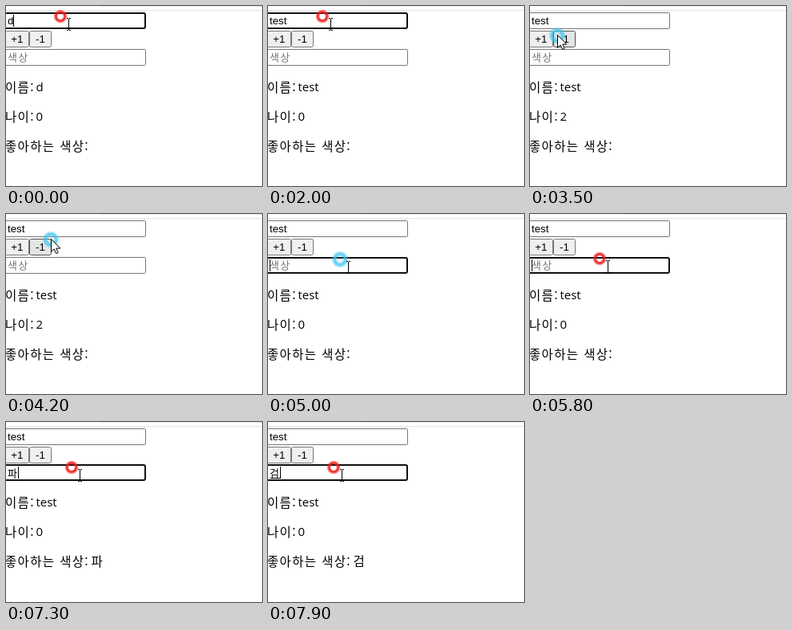
These frames come from a looping animation (320x226 px, 8 s). An HTML page:

```html
<!DOCTYPE html>
<html lang="ko">
<head>
<meta charset="utf-8">
<title>Form demo</title>
<style>
  html, body { margin: 0; width: 100%; height: 100%; overflow: hidden; background: #fff; }
  svg { display: block; width: 100vw; height: 100vh; }
  text { fill: #000; white-space: pre; }
  .field { font: 13.333px "Liberation Sans", Arial, sans-serif; }
  .ko { font: 300 13px "Noto Sans CJK KR", "Noto Sans CJK JP", sans-serif; letter-spacing: 1.35px; }
  .label { font: 300 15.5px "Noto Sans CJK KR", "Noto Sans CJK JP", sans-serif; letter-spacing: 1.35px; }
  .value { font: 15px "Open Sans", "Noto Sans", sans-serif; }
  .hint { fill: #757575; }
  .box { fill: #fff; stroke: #767676; }
  .box.focus { stroke: #101010; stroke-width: 2; }
  .button { fill: #efefef; stroke: #767676; }
  .button.hover { fill: #e5e5e5; stroke: #4f4f4f; }
</style>
</head>
<body>
<svg viewBox="0 0 320 226">
  <defs>
    <radialGradient id="red">
      <stop offset=".35" stop-color="#f01818" stop-opacity="0"/>
      <stop offset=".55" stop-color="#f01818" stop-opacity=".95"/>
      <stop offset=".7" stop-color="#f01818" stop-opacity=".85"/>
      <stop offset="1" stop-color="#f01818" stop-opacity="0"/>
    </radialGradient>
    <radialGradient id="blue">
      <stop offset=".3" stop-color="#35c4f0" stop-opacity=".12"/>
      <stop offset=".55" stop-color="#35c4f0" stop-opacity=".8"/>
      <stop offset=".7" stop-color="#35c4f0" stop-opacity=".7"/>
      <stop offset="1" stop-color="#35c4f0" stop-opacity="0"/>
    </radialGradient>
  </defs>

  <path d="M116 .5H320" stroke="#ececec"/>
  <path d="M0 5.5H320" stroke="#e4e4e4"/>

  <rect id="nameBox" class="box"/>
  <text id="nameText" class="field" x="2" y="23"></text>

  <rect id="plus" class="button" x="-1.5" y="31.5" width="30" height="20" rx="2"/>
  <text class="field" x="6.3" y="46">+1</text>
  <rect id="minus" class="button" x="29.5" y="31.5" width="27" height="20" rx="2"/>
  <text class="field" x="37" y="46">-1</text>

  <g id="colorField">
    <rect id="colorBox" class="box"/>
    <text id="hint" class="ko hint" x="2" y="69">색상</text>
    <text id="colorText" x="2"></text>
    <path id="underline" stroke="#000"/>
  </g>
  <path id="caret" stroke="#000"/>

  <g id="labels">
    <text class="label" x="-1" y="108">이름:</text>
    <text id="nameOut" class="value" x="37.5" y="107"></text>
    <text class="label" x="-1" y="145">나이:</text>
    <text id="ageOut" class="value" x="37.5" y="144"></text>
    <text class="label" x="-1" y="182">좋아하는 색상:</text>
    <text id="colorOut" x="106.5" y="182"></text>
  </g>

  <g id="pointer">
    <circle id="ring"/>
    <path id="beam" d="M8 2.5h2M11 2.5h2M10.5 3v14M8 17.5h2M11 17.5h2" fill="none" stroke="#000"/>
    <path id="arrow" d="M.5 -.5V15.5L4.2 12L6.7 17.6L9.2 16.5L6.8 11.1H11.8Z" fill="#fff" stroke="#000" stroke-linejoin="round"/>
  </g>
</svg>
<script>
const LOOP = 8000;
const $ = id => document.getElementById(id);

// Each step is [time, value], held until the next one.
const names = [[0, 'd'], [200, ''], [500, 't'], [700, 'te'], [900, 'tes'], [1100, 'test']];
const ages = [[0, 0], [2700, 1], [3200, 2], [4300, 1], [4500, 0]];
const colors = [
  [0, ''], [5200, 'v'], [5400, 'vk'], [5700, 'v'], [5800, ''],
  [5900, 'ㅍ'], [6000, '파'], [6100, '파라'], [6200, '파란'],
  [6400, '파란ㅅ'], [6500, '파란새'], [6600, '파란색'],
  [7100, '파란'], [7250, '파'], [7400, ''],
  [7600, 'ㄱ'], [7750, '거'], [7900, '검']
];
const composing = [[0, false], [5900, true], [6800, false], [7600, true]];
const focus = [[0, 'name'], [2700, ''], [4800, 'color']];
const tint = [[0, 'red'], [2050, 'blue'], [5750, 'red']];
const ringSize = { red: 9, blue: 11 };

// Pointer path: [time, x, y]
const path = [
  [0, 68, 13], [2000, 68, 13], [2600, 13, 41], [3300, 13, 41],
  [3700, 55, 33], [4000, 55, 30], [4200, 56, 32], [4450, 57, 32],
  [4600, 70, 49], [4850, 90, 57], [5700, 90, 57], [5900, 85, 55], [6100, 82, 57], [LOOP, 82, 57]
];

const step = (list, t) => list.filter(s => s[0] <= t).pop();
const held = (list, t) => step(list, t)[1];
const isHangul = s => /[ㄱ-ㅎ가-힣]/.test(s);

function set(el, attrs) {
  for (const key in attrs) el.setAttribute(key, attrs[key]);
}

function show(el, on) {
  el.style.display = on ? '' : 'none';
}

// A pointer only ever stands on whole pixels.
function position(t) {
  const i = Math.max(1, path.findIndex(p => p[0] > t));
  const [a, b] = [path[i - 1], path[i]];
  const k = (t - a[0]) / (b[0] - a[0]);
  const ease = k * k * (3 - 2 * k);
  return [1, 2].map(n => Math.round(a[n] + (b[n] - a[n]) * ease));
}

function drawBox(el, top, focused) {
  el.classList.toggle('focus', focused);
  set(el, focused
    ? { x: -2, y: top + 1, width: 176, height: 19, rx: 2 }
    : { x: -1.5, y: top + .5, width: 176, height: 20, rx: 1 });
}

function drawCaret(t, target, name, color, lift) {
  const inName = target === 'name';
  const since = Math.max(step(inName ? names : colors, t)[0], step(focus, t)[0]);
  const on = target && Math.floor((t - since) / 500) % 2 === 0;
  show($('caret'), on);
  if (!on) return;
  const text = $(inName ? 'nameText' : 'colorText');
  const width = (inName ? name : color) ? text.getComputedTextLength() : 0;
  const x = Math.floor(2 + width) + .5;
  set($('caret'), { d: `M${x} ${inName ? 11 : 57 - lift}v15` });
}

function drawPointer(t) {
  const [x, y] = position(t);
  const inside = (top, bottom) => y >= top && y < bottom;
  const overField = x < 175 && (inside(8, 29) || inside(54, 75));
  const overButton = inside(31, 52);
  set($('pointer'), { transform: `translate(${x} ${y})` });
  show($('beam'), overField);
  show($('arrow'), !overField);
  $('plus').classList.toggle('hover', overButton && x < 29);
  $('minus').classList.toggle('hover', overButton && x >= 29 && x <= 57);

  const hue = held(tint, t);
  set($('ring'), { r: ringSize[hue], fill: `url(#${hue})` });
}

function draw(t) {
  const name = held(names, t);
  const color = held(colors, t);
  const target = held(focus, t);
  const hangul = isHangul(color);
  const lift = hangul ? 1 : 0; // Hangul input makes the row one pixel shorter

  $('nameText').textContent = $('nameOut').textContent = name;
  $('ageOut').textContent = held(ages, t);
  $('colorText').textContent = $('colorOut').textContent = color;
  set($('colorText'), { class: hangul ? 'ko' : 'field', y: hangul ? 70 : 69 });
  set($('colorOut'), { class: hangul ? 'label' : 'value' });
  show($('hint'), !color);

  drawBox($('nameBox'), 8, target === 'name');
  drawBox($('colorBox'), 54, target === 'color');
  set($('colorField'), { transform: `translate(0 ${-lift})` });
  set($('labels'), { transform: `translate(0 ${-lift})` });

  const marked = hangul && held(composing, t);
  show($('underline'), marked);
  if (marked) set($('underline'), { d: `M${3 + (color.length - 1) * 13.3} 71.5h12` });

  drawCaret(t, target, name, color, lift);
  drawPointer(t);
}

const start = performance.now();
function tick() {
  draw((performance.now() - start) % LOOP);
  requestAnimationFrame(tick);
}
tick();
</script>
</body>
</html>
```
